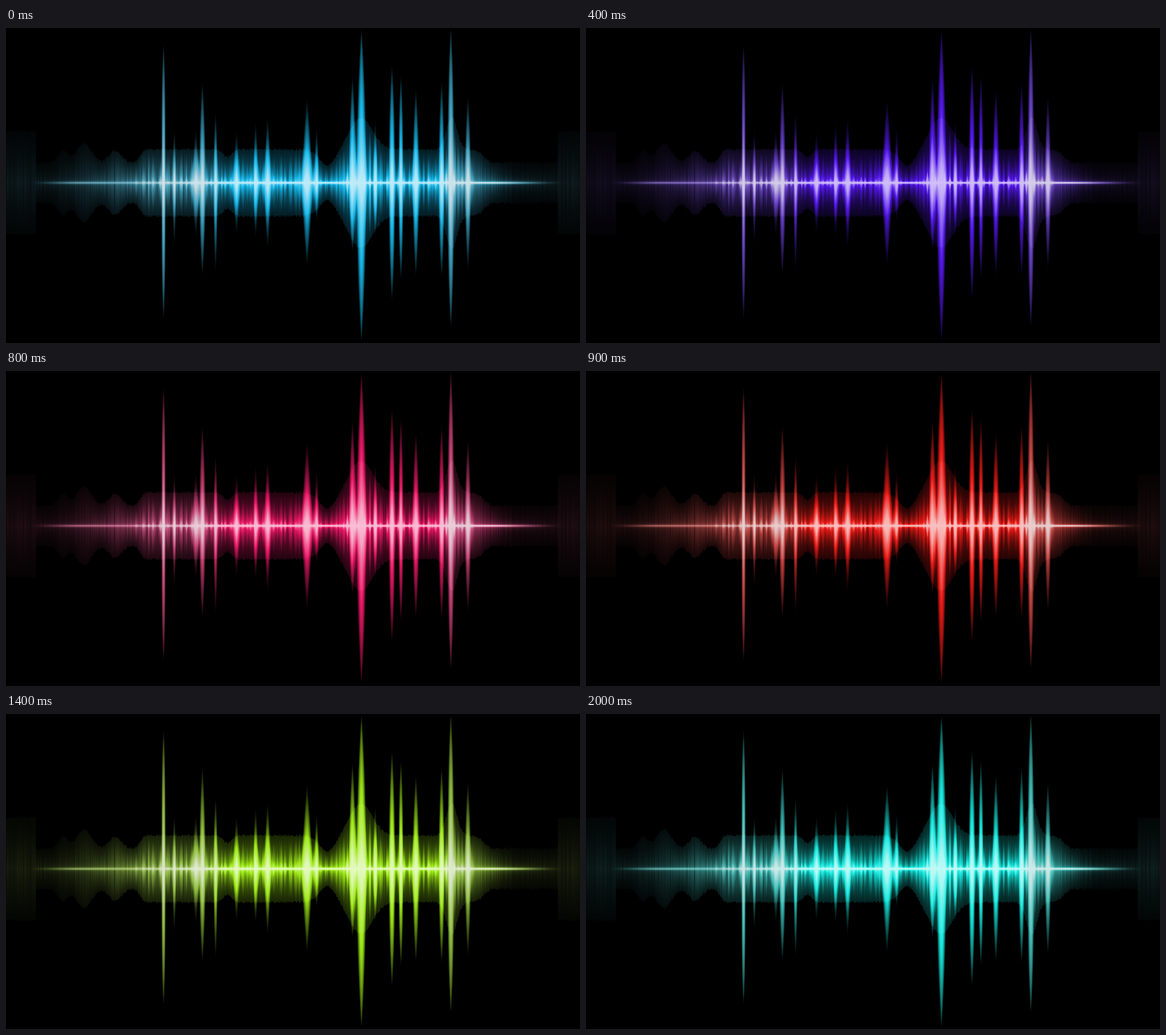
Recreate the animation shown at these times as an HTML page with a canvas. Size 960x528 px, loop 2.1 s.

```html
<!DOCTYPE html>
<html lang="en">
<head>
<meta charset="utf-8">
<title>Sound wave</title>
<style>
html, body { margin: 0; width: 100%; height: 100%; overflow: hidden; background: #000; }
canvas { display: block; width: 960px; height: 528px; }
</style>
</head>
<body>
<canvas id="stage" width="960" height="528"></canvas>
<script>
const W = 960, H = 528, MID = 259, STEP = 100, LOOP = 2100;
const ctx = document.getElementById('stage').getContext('2d');
const image = ctx.createImageData(W, H);
const level = new Float32Array(W * H);
const chroma = new Float32Array(W * H);

let seed = 11;
const random = (low, high) => low + (high - low) * (seed = seed * 16807 % 2147483647) / 2147483647;
const clamp = v => Math.min(1, Math.max(0, v));
const ramp = (from, to, x) => {
  const t = clamp((x - from) / (to - from));
  return t * t * (3 - 2 * t);
};

// Linear interpolation through [position, value] pairs.
function sample(points, x) {
  const i = points.findIndex(p => p[0] > x);
  if (i <= 0) return points.at(i)[1];
  const [x0, v0] = points[i - 1], [x1, v1] = points[i];
  return v0 + (v1 - v0) * (x - x0) / (x1 - x0);
}

// Step number and unwrapped hue.
const hues = [[0, 194], [4, 257], [6, 291], [9, 361], [12, 412], [17, 486], [20, 537], [21, 554]];
// x and loss of colour.
const dulling = [[0, .95], [200, .65], [330, .45], [372, 0], [728, 0], [742, .5], [810, .5], [930, .95]];
// Bumps of the dim band: x, spread, height.
const bumps = [[95, 8, 20], [130, 12, 32], [182, 10, 20], [370, 7, -12], [538, 14, -27], [593, 19, 53], [745, 9, 54]];
// x, half width, reach up, reach down if different.
const peaks = [
  [263, 3, 230, 226], [281, 2.5, 93, 110], [317, 7, 94], [328, 5, 169, 155], [350, 3, 120, 151],
  [385, 6, 91], [417, 4, 104, 93], [437, 5.5, 112], [503, 10, 141], [519, 3.5, 96, 62],
  [579, 6, 177, 114], [594, 8, 256, 264], [617, 3.5, 107, 92], [645, 5, 196], [660, 3.5, 180, 161],
  [685, 5.5, 157], [728, 4.5, 170, 158], [743.5, 5, 257, 239], [772, 5, 146]
];

const presence = x => ramp(70, 255, x) * (1 - ramp(770, 860, x));
const fade = Float32Array.from({ length: W }, (_, x) => .2 + .8 * presence(x));

function bandHeight(x) {
  const fringe = x < 50 || x > 922 ? 52 : 0;
  const plateau = 22 * ramp(212, 235, x) * (1 - ramp(780, 815, x));
  return bumps.reduce((sum, [c, spread, h]) => sum + h * Math.exp(-(((x - c) / spread) ** 2) / 2),
    34 + fringe + plateau);
}

function blend(x, y, value) {
  const i = y * W + x;
  level[i] = 1 - (1 - level[i]) * (1 - value);
}

// A spindle around the axis; tall ones stay bright and wide for longer.
function drawSpike(x, half, up, down, gain, decay = 140 / up) {
  const round = up / half / 18 + .4;
  for (let y = Math.max(0, Math.ceil(MID - up)); y < Math.min(H, MID + down); y++) {
    const u = Math.abs(y - MID) / (y < MID ? up : down);
    const width = half * (1 - u ** round) + .5;
    const glow = gain * (1 - u) ** decay;
    for (let px = Math.ceil(x - width); px <= x + width; px++) {
      const q = Math.abs(px - x) / width;
      blend(px, y, glow * (1 - q * q) * fade[px]);
    }
  }
}

function drawBand() {
  for (let x = 0; x < W; x++) {
    const here = presence(x), streak = random(.6, 1.3);
    const height = bandHeight(x) + random(-2, 2);
    const line = ramp(35, 130, x) * (1 - ramp(800, 935, x)) * (.5 + .45 * ramp(200, 360, x));
    for (let y = Math.ceil(MID - height); y < MID + height; y++) {
      const d = Math.abs(y - MID);
      blend(x, y, .02 + .07 * here + .34 * fade[x] * streak * (1 - d / (height + 2)) ** 1.4);
      blend(x, y, line * (.85 * Math.exp(-d * d / 4) + .25 * Math.exp(-d / 4)));
    }
  }
}

function build() {
  drawBand();
  for (let x = 218; x < 780; x += random(5, 12)) {
    const height = bandHeight(x), strength = height / 60;
    const reach = height * random(.6, 1.1), knot = random(4, 16) * strength;
    drawSpike(x, random(2, 5), reach, reach, .4 * strength, 1.3);
    drawSpike(x, random(2, 5), knot, knot, .65 * strength, .7);
  }
  for (const [x, half, up, down = up] of peaks) {
    const halo = Math.min(80, up * .7), knot = 6 + up * .18;
    drawSpike(x, half * 2.5, halo, halo, .32, 1.2);
    drawSpike(x, half, up, down, .86);
    drawSpike(x, half, knot, knot, .75, .6);
  }

  // Turn levels into HSL lightness and chroma.
  for (let x = 0; x < W; x++) {
    const dull = sample(dulling, x);
    for (let y = 0; y < H; y++) {
      const i = y * W + x, light = level[i] * .86;
      const saturation = .82 * (1 - dull * clamp(.5 + level[i] * .6));
      level[i] = light;
      chroma[i] = saturation * (1 - Math.abs(2 * light - 1));
    }
  }
}

function paint(hue) {
  const tint = [0, 4, 2].map(shift => clamp(Math.abs((hue / 60 + shift) % 6 - 3) - 1) - .5);
  const data = image.data;
  for (let i = 0, j = 0; i < level.length; i++, j += 4) {
    for (let c = 0; c < 3; c++) data[j + c] = 255 * (level[i] + chroma[i] * tint[c]);
    data[j + 3] = 255;
  }
  ctx.putImageData(image, 0, 0);
}

let start, shown = -1;
function frame(now) {
  start ??= now;
  const step = Math.floor((now - start) % LOOP / STEP);
  if (step !== shown) paint(sample(hues, shown = step));
  requestAnimationFrame(frame);
}

build();
requestAnimationFrame(frame);
</script>
</body>
</html>
```
